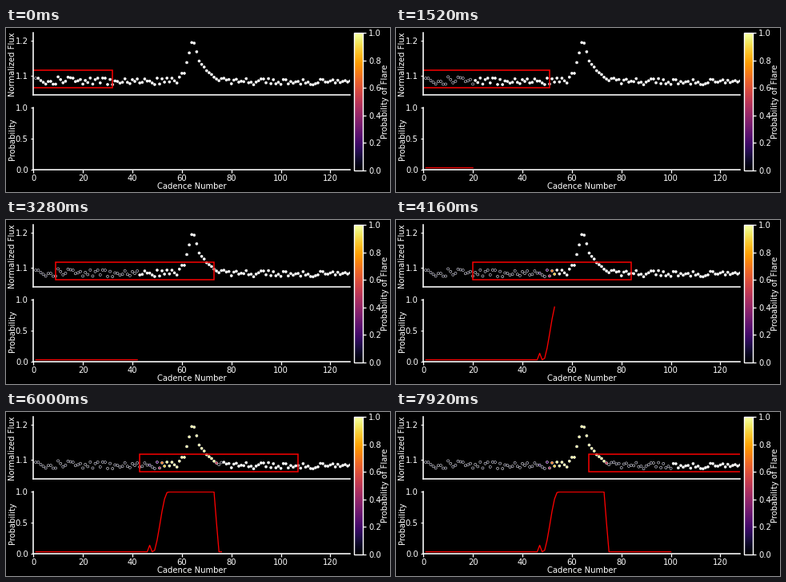
Recreate the animation shown at these times as a matplotlib script. Size 480 px wide and 206 px high, loop 8000 ms.

```python
import matplotlib.pyplot as plt
import numpy as np
from matplotlib.animation import FuncAnimation
from matplotlib.cm import ScalarMappable
from matplotlib.colors import Normalize
from matplotlib.patches import Rectangle

W, H, DPI = 480, 206, 100
FRAMES, INTERVAL = 100, 80
PX = 72 / DPI  # points per pixel
CADENCES, HALF_WINDOW = 128, 32

plt.rcParams.update({
    "font.family": "DejaVu Sans", "font.size": 10 * PX,
    "text.color": "white", "axes.edgecolor": "white",
    "xtick.color": "white", "ytick.color": "white",
    "axes.facecolor": "black", "figure.facecolor": "black",
    "axes.linewidth": 1.6 * PX,
    "axes.spines.top": False, "axes.spines.right": False,
})


def light_curve(x):
    """Quiet star with fading noise and one flare: fast rise, slow decay."""
    flare = np.interp(x, [58, 60, 61, 62, 64, 65, 67, 70, 75],
                      [0, .022, .022, .053, .109, .109, .057, .031, 0])
    noise = np.random.default_rng(5).uniform(-1, 1, len(x))
    noise *= np.interp(x, [1, CADENCES], [.011, .008])
    quiet = np.interp(x, [1, CADENCES], [1.0865, 1.0825])
    return quiet + flare + np.where(flare > 0, .15, 1) * noise


def flare_probability(x):
    """Small early blip, eased rise to certainty, then a sharp drop."""
    rise = np.sin(np.pi / 2 * np.clip((x - 48) / 6.4, 0, 1)) ** 2
    fall = np.clip((75 - x) / 2, 0, 1)
    blip = np.where(x == 47, .14, 0)
    return np.maximum(.035, rise * fall + blip)


cadence = np.arange(1, CADENCES + 1)
prob = flare_probability(cadence)
prob_colors = plt.get_cmap("inferno")(prob)

fig = plt.figure(figsize=(W / DPI, H / DPI), dpi=DPI)


def add_axes(x0, y0, x1, y1):
    ax = fig.add_axes([x0 / W, 1 - y1 / H, (x1 - x0) / W, (y1 - y0) / H])
    ax.tick_params(length=3.5 * PX, width=1.3 * PX)
    ax.tick_params(axis="x", pad=1.8 * PX)
    ax.tick_params(axis="y", pad=3 * PX)
    return ax


def label(x, y, text, rotation=0):
    fig.text(x / W, 1 - y / H, text, rotation=rotation, ha="center",
             va="baseline", rotation_mode="anchor")


flux_ax = add_axes(34.2, 6.3, 430.2, 84.3)
flux_ax.set(xlim=(0, CADENCES), ylim=(1.0455, 1.221),
            xticks=[], yticks=[1.1, 1.2])

prob_ax = add_axes(34.2, 100.4, 430.2, 178.3)
prob_ax.set(xlim=(0, CADENCES), ylim=(0, 1),
            xticks=range(0, 121, 20), yticks=[0, .5, 1])

bar_ax = add_axes(435.2, 6.2, 446.4, 178.6)
bar = fig.colorbar(ScalarMappable(Normalize(0, 1), "inferno"), cax=bar_ax,
                   ticks=np.linspace(0, 1, 6))
bar.outline.set(edgecolor="white", linewidth=1.4 * PX)

label(11.5, 45.3, "Normalized Flux", 90)
label(11, 139.5, "Probability", 90)
label(477, 92.5, "Probability of Flare", 90)
label(232.2, 201.5, "Cadence Number")

dots = flux_ax.scatter(cadence, light_curve(cadence), s=(3.1 * PX) ** 2,
                       edgecolors="white", linewidths=0.5 * PX)
window = flux_ax.add_patch(Rectangle(
    (-HALF_WINDOW, 1.0655), 2 * HALF_WINDOW, 0.0495, fill=False,
    edgecolor="red", linewidth=1.5 * PX, zorder=2))
curve, = prob_ax.plot([], [], color="red", linewidth=1.3 * PX, snap=False)


def update(frame):
    seen = frame + 1
    faces = np.ones((CADENCES, 4))
    faces[:seen] = prob_colors[:seen]
    dots.set_facecolors(faces)
    window.set_x(frame - HALF_WINDOW)
    curve.set_data(cadence[:seen], prob[:seen])
    return dots, window, curve


anim = FuncAnimation(fig, update, frames=FRAMES, interval=INTERVAL,
                     repeat=True, repeat_delay=0)
plt.show()
```
